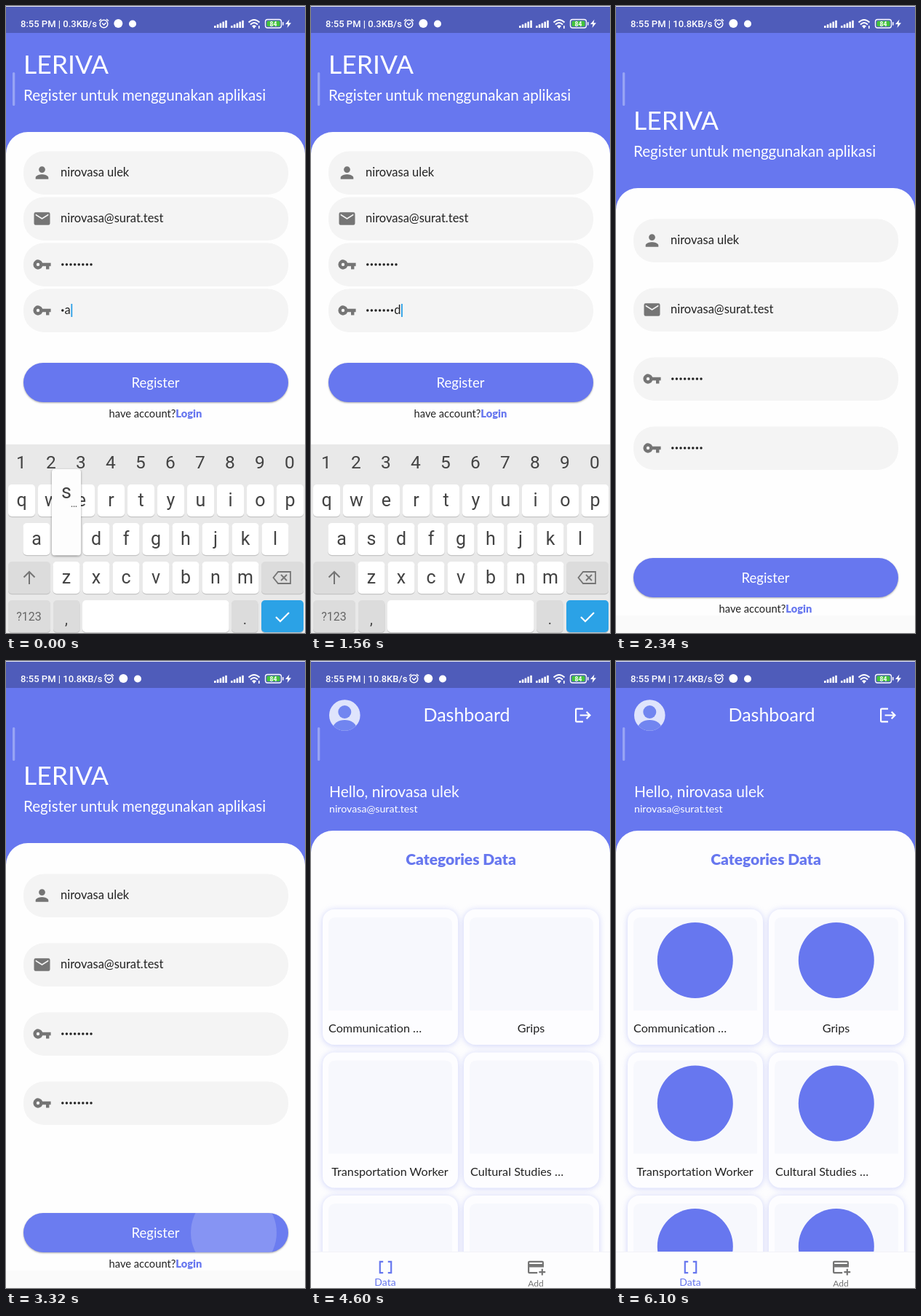
An HTML page that plays this animation: 411x861 px, repeating every 8 s.

```html
<!DOCTYPE html>
<html lang="id">
<head>
<meta charset="utf-8">
<title>Register</title>
<style>
  html, body { margin: 0; width: 100%; height: 100%; overflow: hidden; background: #fafafa; }
  svg { display: block; width: 411px; height: 861px; font-family: Lato, sans-serif; font-variant-ligatures: none; }
  .mid { text-anchor: middle; }
  .keys, .status { font-family: Roboto, sans-serif; }
  .keys { fill: #434343; font-size: 25px; text-anchor: middle; }
  .button { filter: drop-shadow(0 1.5px 1.2px #0005); }
  .tile { filter: drop-shadow(0 1px 4px #6777ef50); }
  .popup { filter: drop-shadow(0 1.5px 1.5px #0006); }
</style>
</head>
<body>
<svg id="stage" viewBox="0 0 411 861"></svg>
<script>
const LOOP = 8000;
const BLUE = '#6777ef';
const USER = 'nirovasa ulek';
const MAIL = 'nirovasa@surat.test';
const ROWS = [
  { letters: 'qwertyuiop', x: 21.5, y: 657 },
  { letters: 'asdfghjkl', x: 42, y: 710 },
  { letters: 'zxcvbnm', x: 83, y: 763 }
];

// Step tables: [start in ms, value]
const POPUP = [[0, 's'], [150, ''], [390, 'w'], [540, ''], [850, 'o'], [970, ''],
  [1120, 'r'], [1270, ''], [1410, 'd'], [1560, '']];
const TYPED = [[0, 'pa'], [150, 'pas'], [390, 'pass'], [540, 'passw'], [970, 'passwo'],
  [1270, 'passwor'], [1560, 'password']];
const KEYBOARD_DROP = [[0, 0], [1830, 133], [1980, 300]];
const EXPAND = [[0, 0], [2100, 0.054], [2220, 0.6], [2340, 1]];
const SPLASH = [[0, [0, 0]], [3320, [59, 0.18]], [3460, [125, 0.14]], [3580, [240, 0.06]], [3730, [0, 0]]];
const SPEED = [[0, '0.3'], [1980, '10.8'], [6100, '17.4']];
const DASHBOARD = [[0, 0], [4090, 0.5], [4210, 1]];
const TILES = [[0, 0], [4360, 0.3], [4480, 0.7], [4600, 1]];

const at = (table, t) => table.findLast(([start]) => start <= t)[1];
const mix = (a, b, p) => Math.round(a + (b - a) * p);
const range = n => [...Array(n).keys()];
const rect = (x, y, w, h, r, fill, more = '') =>
  `<rect x="${x}" y="${y}" width="${w}" height="${h}" rx="${r}" fill="${fill}" ${more}/>`;
const circle = (x, y, r, fill, more = '') =>
  `<circle cx="${x}" cy="${y}" r="${r}" fill="${fill}" ${more}/>`;
const text = (x, y, size, content, more = '') =>
  `<text x="${x}" y="${y}" font-size="${size}" ${more}>${content}</text>`;
const line = (d, color, width, more = '') =>
  `<path d="${d}" fill="none" stroke="${color}" stroke-width="${width}" ${more}/>`;
const dots = n => range(n).map(i => circle(77.8 + 5.6 * i, 0, 1.75, '#222')).join('');

// Icons on a 24 unit grid, placed by their centre
const ICONS = {
  person: 'M12 12a4 4 0 1 0 0-8 4 4 0 0 0 0 8zm0 2c-2.7 0-8 1.3-8 4v2h16v-2c0-2.7-5.3-4-8-4z',
  mail: 'M20 4H4a2 2 0 0 0-2 2v12a2 2 0 0 0 2 2h16a2 2 0 0 0 2-2V6a2 2 0 0 0-2-2zm0 4l-8 5-8-5V6l8 5 8-5z',
  key: 'M12.65 10A6 6 0 1 0 12.65 14H17v4h4v-4h2v-4zM7 14a2 2 0 1 1 0-4 2 2 0 0 1 0 4z',
  exit: 'M17 7l-1.4 1.4L18.2 11H8v2h10.2l-2.6 2.6L17 17l5-5zM4 5h8V3H4a2 2 0 0 0-2 2v14a2 2 0 0 0 2 2h8v-2H4z',
  brackets: 'M15 4v2h3v12h-3v2h5V4zM4 20h5v-2H6V6h3V4H4z',
  addCard: 'M20 4H4a2 2 0 0 0-2 2v12a2 2 0 0 0 2 2h10v-2H4v-6h18V6a2 2 0 0 0-2-2zm0 4H4V6h16zm4 9v2h-3v3h-2v-3h-3v-2h3v-3h2v3z'
};
const icon = (name, x, y, fill) =>
  `<path transform="translate(${x} ${y}) scale(1.1) translate(-12 -12)" fill="${fill}" d="${ICONS[name]}"/>`;

function field(i) {
  const content = i < 2 ? text(75, 5, 16.5, [USER, MAIL][i], 'fill="#222"')
    : i === 2 ? dots(8) : '<g id="secret"></g>';
  return `<g id="field${i}">${rect(24, -29.5, 364, 59.5, 28, '#f4f4f4', 'class="fill"')}
    ${icon(['person', 'mail', 'key', 'key'][i], 49.5, 0, '#757575')}${content}</g>`;
}

function loginPage() {
  return `${rect(0, 0, 411, 861, 0, '#fafafa')}
    ${rect(0, 0, 411, 735, 0, '#fdfdfd', 'id="rest"')}
    ${rect(0, 0, 411, 300, 0, BLUE)}
    <g id="title" fill="#fff">
      ${text(24, 93, 35.5, 'LERIVA')}
      ${text(24, 130, 20.6, 'Register untuk menggunakan aplikasi')}
    </g>
    <path id="card"/>
    ${range(4).map(field).join('')}
    <g id="button">
      ${rect(24, -27, 364, 54, 27, BLUE, 'id="face" class="button"')}
      <g clip-path="url(#pill)">${circle(313, 0, 0, '#fff', 'id="splash"')}</g>
      ${text(205.5, 7, 18.5, 'Register', 'class="mid" fill="#fff"')}
      ${text(205.5, 48, 14.7, `have account?<tspan font-weight="900" fill="${BLUE}">Login</tspan>`, 'class="mid" fill="#222"')}
    </g>`;
}

function keyCap(x, y, w, fill = '#fff') {
  return rect(x, y + 1.2, w, 44, 5, '#c4c4c4') + rect(x, y, w, 44, 5, fill);
}

function keyboard() {
  const numbers = range(10).map(i => text(21 + 41 * i, 634.5, 24.5, (i + 1) % 10)).join('');
  const letters = ROWS.map(({ letters, x, y }) => [...letters].map((c, i) =>
    keyCap(x + 41 * i - 18.5, y, 37) + text(x + 41 * i, y + 29.5, 25, c)).join('')).join('');
  const gray = '#dcdcdc';
  return `<g id="keyboard" class="keys">
    ${rect(0, 602, 411, 300, 0, '#e9e9e9')}${numbers}${letters}
    ${keyCap(3, 763, 58, gray)}${keyCap(351, 763, 58, gray)}
    ${keyCap(3, 816, 58, gray)}${keyCap(65, 816, 36.5, gray)}${keyCap(105, 816, 201.5)}
    ${keyCap(310, 816, 36.5, gray)}${keyCap(351, 816, 58, '#2ba2e6')}
    ${line('M32 794V777M24.5 784.5L32 777L39.5 784.5', '#757575', 2)}
    ${line('M374 777H391V793H374L367.5 785ZM378 781L386 789M386 781L378 789', '#757575', 1.8)}
    ${text(31.5, 844, 16, '?123', 'fill="#666"')}
    ${text(83, 849, 20, ',')}${text(328.5, 849, 20, '.')}
    ${line('M371 839L377 845L389 833', '#fff', 2.2)}
    <g id="popup"></g>
  </g>`;
}

function tile(i) {
  const x = 16 + 194 * (i % 2), y = 341 + 196.5 * Math.floor(i / 2);
  const labels = [['Communication …', 24], ['Grips'], ['Transportation Worker'], ['Cultural Studies …', 219]];
  const [label, left] = labels[i] || [''];
  const more = 'fill="#222"' + (left ? '' : ' class="mid"');
  return `${rect(x, y, 186, 186, 16, '#fdfdff', 'class="tile"')}
    <path d="M${x + 8} ${y + 139}v-118q0-10 10-10h150q10 0 10 10v118z" fill="#f7f8fd"/>
    ${circle(x + 92.8, y + 70, 52, BLUE, 'class="picture"')}
    ${text(left || x + 92.5, y + 169, 16.2, label, more)}`;
}

function dashboard() {
  return `<g id="dashboard">
    ${rect(0, 0, 411, 861, 0, BLUE)}
    <clipPath id="avatar">${circle(46.3, 74.5, 21.3, '#fff')}</clipPath>
    ${circle(46.3, 74.5, 21.3, '#dfe4fc')}
    <g clip-path="url(#avatar)">${circle(46.3, 70, 9, '#7185f0')}
      <ellipse cx="46.3" cy="92" rx="16" ry="11" fill="#7185f0"/></g>
    <g fill="#fff">
      ${text(214, 83, 25, 'Dashboard', 'class="mid"')}
      ${text(25, 187, 21, '', 'id="hello"')}
      ${text(25, 208, 14.2, MAIL, 'id="mail"')}
    </g>
    ${icon('exit', 374, 74.5, '#fff')}
    <path d="${cardPath(233, 861)}" fill="#fdfdfe"/>
    ${text(206, 280, 21, 'Categories Data', `class="mid" font-weight="900" fill="${BLUE}"`)}
    <g id="tiles">${range(6).map(tile).join('')}</g>
    ${rect(0, 811, 411, 50, 0, '#f3f3f8')}${rect(0, 812, 411, 49, 0, '#fdfdfe')}
    ${icon('brackets', 102.5, 832.5, BLUE)}
    ${text(102, 858, 14, 'Data', `class="mid" fill="${BLUE}"`)}
    ${icon('addCard', 309, 832.5, '#757575')}
    ${text(309, 858.5, 12, 'Add', 'class="mid" fill="#757575"')}
  </g>`;
}

function statusBar() {
  const bars = x => range(5).map(i => rect(x + 3.8 * i, 27 - 1.8 * i, 2.6, 3 + 1.8 * i, 0.6, '#fff')).join('');
  return `<g class="status" fill="#fff">
    ${rect(0, 0, 411, 37, 0, '#4f5cba')}${rect(0, 0, 411, 1, 0, '#e9ebf6')}
    ${text(20, 28.5, 13, '', 'id="clock" font-weight="500"')}
    <g id="notices">
      ${circle(134.5, 24.5, 5.3, 'none', 'stroke="#fff" stroke-width="1.5"')}
      ${line('M132 23.5L134.5 26L137.5 23M128 20.5L131 18M141 20.5L138 18', '#fff', 1.5)}
      ${circle(154.3, 24, 6, '#fff')}${circle(174, 24.5, 5, '#fff')}
    </g>
    ${bars(286)}${bars(309)}
    ${line('M333.5 22.5Q341 15.5 348.5 22.5M336 25.5Q341 20.5 346 25.5', '#fff', 2)}
    <path d="M338 27.5Q341 25 344 27.5L341 31Z"/>
    ${rect(347, 27, 1.6, 4, 0, '#fff', 'id="traffic"')}
    ${rect(356.5, 18.5, 22, 11.5, 3, 'none', 'stroke="#fff" stroke-width="1.3"')}
    ${rect(358.5, 20.5, 18, 7.5, 1.5, '#43c33b')}${rect(380, 22, 1.5, 4.5, 0.5, '#fff')}
    ${text(367.5, 27.6, 8.5, '84', 'class="mid" font-weight="700"')}
    <path d="M389.5 18.5L384 25H387.5L386.5 30L392 23.3H388.5Z"/>
  </g>${rect(9, 91, 3.3, 46, 1.6, '#98a4f4')}`;
}

function cardPath(top, bottom) {
  return `M0 ${bottom}V${top + 30}A30 30 0 0 1 30 ${top}H381A30 30 0 0 1 411 ${top + 30}V${bottom}Z`;
}

stage.innerHTML = `<clipPath id="pill">${rect(24, -27, 364, 54, 27, '#fff')}</clipPath>`
  + loginPage() + keyboard() + dashboard() + statusBar();

const get = id => document.getElementById(id);
const set = (id, name, value) => get(id).setAttribute(name, value);
const shift = (id, y, x = 0) => set(id, 'transform', `translate(${x} ${y})`);
const cache = {};
function fill(id, html) {
  if (cache[id] === html) return false;
  cache[id] = html;
  get(id).innerHTML = html;
  return true;
}

function drawSecret(t) {
  const typed = at(TYPED, t);
  if (t >= 1830) return fill('secret', dots(8));
  const hidden = typed.length - 1, x = 75 + 5.6 * hidden;
  const html = dots(hidden) + text(x, 5, 16.5, typed[hidden], 'id="last" fill="#222"')
    + rect(0, -9, 1.8, 18, 0, '#2a9fe6', 'id="caret"');
  if (fill('secret', html)) set('caret', 'x', x + get('last').getComputedTextLength() + 0.6);
}

function drawPopup(letter) {
  if (!letter) return fill('popup', '');
  const row = ROWS.find(r => r.letters.includes(letter));
  const x = row.x + 41 * row.letters.indexOf(letter), y = row.y - 75;
  fill('popup', rect(x - 20, y + 1, 40, 118.5, 4, '#fdfdfd', 'class="popup"')
    + text(x, y + 40.5, 27, letter) + (letter === 's' ? text(x + 10.5, y + 53, 14, '…') : ''));
}

function render(t) {
  const p = at(EXPAND, t), faint = t >= 2100 && t < 2220;
  shift('title', mix(0, 77, p));
  set('card', 'd', cardPath(mix(172.5, 249.5, p), t < 2100 ? 735 : mix(568, 837, p)));
  set('card', 'fill', faint ? '#fafafa' : '#fefefe');
  set('rest', 'visibility', t < 2220 ? 'visible' : 'hidden');
  for (const i of range(4)) shift('field' + i, mix(229 + 63 * i, 322 + 95 * i, p));
  for (const box of document.querySelectorAll('.fill')) box.style.fill = faint ? '#fafafa' : '#f4f4f4';
  drawSecret(t);

  shift('button', mix(517, 785, p));
  set('face', 'fill', t < 3320 ? BLUE : '#6b7cf0');
  const [radius, alpha] = at(SPLASH, t);
  set('splash', 'r', radius);
  set('splash', 'opacity', alpha);

  shift('keyboard', at(KEYBOARD_DROP, t));
  drawPopup(at(POPUP, t));

  const speed = at(SPEED, t);
  get('clock').textContent = `8:55 PM | ${speed}KB/s`;
  shift('notices', 0, speed.length > 3 ? 7 : 0);
  set('traffic', 'visibility', t < 5140 ? 'visible' : 'hidden');

  set('dashboard', 'opacity', at(DASHBOARD, t));
  get('hello').textContent = 'Hello, ' + (t < 4360 ? '' : USER);
  set('mail', 'opacity', t < 4360 ? 0 : 1);
  set('tiles', 'opacity', at(TILES, t));
  for (const dot of document.querySelectorAll('.picture')) dot.style.opacity = t < 4750 ? 0 : 1;
}

const start = performance.now();
function tick() {
  render((performance.now() - start) % LOOP);
  requestAnimationFrame(tick);
}
tick();
</script>
</body>
</html>
```
